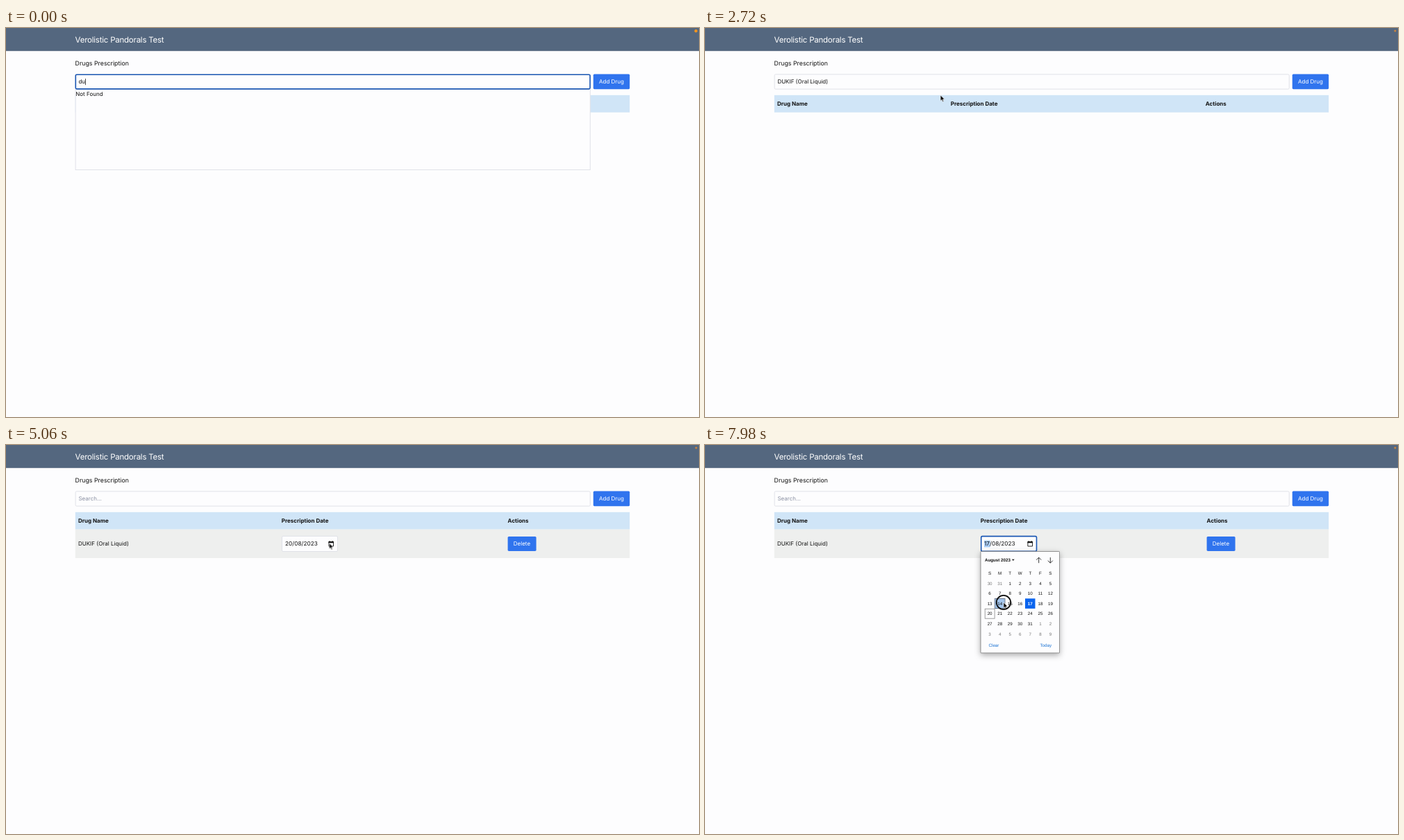
An HTML page for the animation above (8000 ms loop, 998 by 561 pixels).

```html
<!DOCTYPE html>
<html lang="en">
<head>
<meta charset="utf-8">
<title>Drugs Prescription</title>
<style>
html, body { margin: 0; width: 100%; height: 100%; overflow: hidden; background: #fdfdfe; }
svg { display: block; width: 100vw; height: 100vh; }
text { font: 8px Inter, "Open Sans", sans-serif; fill: #111; text-rendering: geometricPrecision; white-space: pre; }
.title { font-size: 11.5px; letter-spacing: -.02em; fill: #fff; }
.label { font-size: 8.8px; }
.head text { font-weight: 700; }
.btn rect { fill: #3074ee; }
.btn text { fill: #fff; }
.hint { fill: #8b91a3; }
.date { font-size: 8.25px; }
.box { fill: #fdfdfe; stroke: #e0e2e8; }
.focus { fill: none; stroke: #1c58b4; stroke-width: 1.6; }
.mark { fill: #a9cdf6; }
.cal text { font: 6.24px "Liberation Sans", Arial, sans-serif; }
.cal .mid { text-anchor: middle; }
.cal .bold { font-weight: 700; }
.cal .dim { fill: #777; }
.cal .link { fill: #1670d2; }
.cal .on { fill: #fff; }
.sel { fill: #0a64ee; }
.panel { fill: #fdfdfe; stroke: #777; stroke-width: .8; filter: drop-shadow(0 3px 4px rgba(0, 0, 0, .32)); }
.icon { fill: none; stroke: #222; stroke-width: .9; }

/* timed switches: 1% = 80 ms */
.t { animation: 8s step-end infinite; }
.type1 { animation-name: type1; }
.type2 { animation-name: type2; }
.type3 { animation-name: type3; }
.typing { animation-name: typing; }
.none { animation-name: none-found; }
.list { animation-name: list; }
.drop { animation-name: drop; }
.filled { animation-name: filled; }
.before { animation-name: before; }
.after { animation-name: after; }
.picking { animation-name: picking; }
.day20 { animation-name: day20; }
.day17 { animation-name: day17; }
.open { animation-name: open; }
.hover { animation-name: hover; fill: #a3c6ee; stroke: #4a5568; stroke-width: .8; }
.dot-a { animation-name: none-found; }
.dot-b { animation-name: dot; }
.arrow { animation-name: arrow; }
.hand { animation-name: hand; }
.ring { animation: ring 8s linear infinite; fill: none; stroke: #0a0a0a; stroke-width: 1.8; }
.pointer { animation: move 8s ease-in-out infinite; }

@keyframes type1 { 0% { opacity: 1 } 1.25%, 100% { opacity: 0 } }
@keyframes type2 { 0% { opacity: 0 } 1.25% { opacity: 1 } 6.5%, 100% { opacity: 0 } }
@keyframes type3 { 0% { opacity: 0 } 6.5% { opacity: 1 } 22.5%, 100% { opacity: 0 } }
@keyframes typing { 0% { opacity: 1 } 20.8%, 100% { opacity: 0 } }
@keyframes none-found { 0% { opacity: 1 } 11.5%, 100% { opacity: 0 } }
@keyframes dot { 0% { opacity: 0 } 11.5%, 100% { opacity: 1 } }
@keyframes list { 0% { opacity: 0 } 11.5% { opacity: 1 } 22.5%, 100% { opacity: 0 } }
@keyframes drop { 0% { opacity: 1 } 22.5%, 100% { opacity: 0 } }
@keyframes filled { 0% { opacity: 0 } 22.5% { opacity: 1 } 45.5%, 100% { opacity: 0 } }
@keyframes before { 0% { opacity: 1 } 45.5%, 100% { opacity: 0 } }
@keyframes after { 0% { opacity: 0 } 45.5%, 100% { opacity: 1 } }
@keyframes picking { 0% { opacity: 0 } 66.5%, 100% { opacity: 1 } }
@keyframes day20 { 0% { opacity: 1 } 80%, 100% { opacity: 0 } }
@keyframes day17 { 0% { opacity: 0 } 80%, 100% { opacity: 1 } }
@keyframes open { 0% { opacity: 0 } 66.5% { opacity: 1 } 80% { opacity: 0 } 90.75%, 100% { opacity: 1 } }
@keyframes hover {
  0% { opacity: 0; transform: translate(58.24px, 14.56px) }
  73% { opacity: 1; transform: translate(58.24px, 14.56px) }
  74% { opacity: 1; transform: translate(58.24px, 29.12px) }
  80% { opacity: 0; transform: translate(29.12px, 14.56px) }
  96.2% { opacity: 1; transform: translate(29.12px, 14.56px) }
  97.3%, 100% { opacity: 1; transform: translate(14.56px, 29.12px) }
}
@keyframes arrow { 0% { opacity: 0 } 12.5% { opacity: 1 } 40% { opacity: 0 } 54.5%, 100% { opacity: 1 } }
@keyframes hand { 0% { opacity: 0 } 40% { opacity: 1 } 54.5%, 100% { opacity: 0 } }
@keyframes ring {
  0%, 20.7%, 23.3%, 43.9%, 46.5%, 65.2%, 67.8%, 78.4%, 81%, 88.7%, 91.3%, 99% { opacity: 0 }
  21%, 23%, 44.2%, 46.2%, 65.5%, 67.5%, 78.7%, 80.7%, 89%, 91%, 99.5%, 100% { opacity: 1 }
}
@keyframes move {
  0%, 12.5% { transform: translate(318px, 160px) }
  18.5%, 31.75% { transform: translate(271px, 99px) }
  41.5%, 53.25% { transform: translate(885.5px, 79.5px) }
  62.5%, 67.5% { transform: translate(465.5px, 141.5px) }
  74.75%, 82% { transform: translate(469.2px, 222.3px) }
  87.5%, 91.3% { transform: translate(469.2px, 143.2px) }
  98.5%, 100% { transform: translate(429.9px, 227px) }
}
</style>
</head>
<body>
<svg viewBox="0 0 998 561" preserveAspectRatio="none">
  <rect width="998" height="561" fill="#fdfdfe"/>
  <rect width="998" height="33.2" fill="#54677f"/>
  <text class="title" x="99.6" y="21.2">Verolistic Pandorals Test</text>
  <circle class="t dot-a" cx="993.6" cy="4.2" r="2.2" fill="#f0941f"/>
  <circle class="t dot-b" cx="993.9" cy="4.1" r="1.6" fill="#c48342"/>

  <text class="label" x="99.6" y="53.8">Drugs Prescription</text>

  <rect x="99.8" y="96.8" width="798.4" height="24.9" fill="#d0e5f7"/>
  <g class="t head before">
    <text x="104" y="112.1">Drug Name</text>
    <text x="353.8" y="112.1">Prescription Date</text>
    <text x="720.8" y="112.1">Actions</text>
  </g>

  <g class="t after">
    <rect x="99.8" y="121.7" width="798.4" height="41.4" fill="#eeefee"/>
    <g class="head">
      <text x="104" y="112.1">Drug Name</text>
      <text x="396.8" y="112.1">Prescription Date</text>
      <text x="722.6" y="112.1">Actions</text>
    </g>
    <text x="104" y="145.3">DUKIF (Oral Liquid)</text>
    <rect class="box" x="397.5" y="131.5" width="80" height="22" rx="1.5"/>
    <g class="t picking">
      <rect class="focus" x="397.7" y="131.6" width="79.8" height="21.7" rx="1.8"/>
      <rect class="t mark day20" x="402" y="137.6" width="10.2" height="9.8"/>
      <rect class="t mark day17" x="402" y="137.6" width="8.6" height="9.8"/>
    </g>
    <text class="t date day20" x="402" y="145.4">20/08/2023</text>
    <text class="t date day17" x="402" y="145.4">17/08/2023</text>
    <path d="M464.9 139.6h6.6v6.4h-6.6z" fill="none" stroke="#111" stroke-width=".9"/>
    <path d="M464.5 139.2h7.4v2h-7.4zM465.6 138.3h1v1h-1zM469.8 138.3h1v1h-1z" fill="#111"/>
    <g class="btn">
      <rect x="722.6" y="132" width="41" height="20.9" rx="1.6"/>
      <text x="730.8" y="145.3">Delete</text>
    </g>
  </g>

  <rect class="box" x="100.1" y="66.9" width="741.2" height="21.2" rx="1.6"/>
  <g class="t drop">
    <rect class="box" x="100.1" y="88.3" width="741.2" height="116.2"/>
    <text class="t none" x="100.3" y="98.2">Not Found</text>
    <g class="t list">
      <text x="100.3" y="98.2">DUKIF (Oral Liquid)</text>
      <text x="100.3" y="110.7">DUKIF (Oral Pill)</text>
      <text x="100.3" y="123.2">DUKIF COLD (Oral Pill)</text>
      <text x="100.3" y="135.7">DUKIF PM (Oral Pill)</text>
    </g>
  </g>
  <rect class="t focus typing" x="100.3" y="67.2" width="740.8" height="20.7" rx="1.6"/>
  <g class="t type1"><text x="104.4" y="80.4">du</text><rect x="114.1" y="73" width=".7" height="9.2"/></g>
  <g class="t type2"><text x="104.4" y="80.4">duk</text><rect x="118.6" y="73" width=".7" height="9.2"/></g>
  <g class="t type3"><text x="104.4" y="80.4">dukif</text><rect class="t typing" x="123.2" y="73" width=".7" height="9.2"/></g>
  <text class="t filled" x="104.4" y="80.4">DUKIF (Oral Liquid)</text>
  <text class="t hint after" x="104.4" y="80.4">Search...</text>
  <g class="btn">
    <rect x="845.8" y="66.6" width="52.4" height="21.6" rx="1.6"/>
    <text x="854" y="80.4">Add Drug</text>
  </g>

  <g class="t cal open">
    <rect class="panel" x="397" y="153.5" width="113.6" height="146.4" rx=".8"/>
    <text class="bold" x="402.9" y="168">August 2023</text>
    <path d="M441.8 164.8h4l-2 2.2z" fill="#222"/>
    <path class="icon" d="M480.7 170.2v-8M477.2 165.7l3.5-3.5 3.5 3.5M497.3 162.2v8M493.8 166.7l3.5 3.5 3.5-3.5"/>
    <rect class="t hover" x="402.9" y="192.3" width="14.3" height="14.3"/>
    <g id="days"></g>
    <g class="t day20">
      <rect class="sel" x="402.8" y="235.9" width="14.5" height="14.5"/>
      <text class="mid bold on" x="410.1" y="245.5">20</text>
    </g>
    <g class="t day17">
      <rect x="403.2" y="236.3" width="13.9" height="13.9" fill="none" stroke="#888" stroke-width=".8"/>
      <rect class="sel" x="461" y="221.4" width="14.5" height="14.5"/>
      <text class="mid bold on" x="468.3" y="230.9">17</text>
    </g>
    <text class="link" x="408.5" y="290.9">Clear</text>
    <text class="link" x="482.4" y="290.9">Today</text>
  </g>

  <g class="pointer">
    <path class="t arrow" d="M0 0V8.2L1.9 6.5L3.2 9.4L4.6 8.8L3.3 6H5.9Z" fill="#0a0a0a" stroke="#fff" stroke-width=".6"/>
    <path class="t hand" d="M-.8 .6Q0-.4 .7 .6V3L3.6 3.8Q4.5 4.1 4.3 5.2L3.6 8.2H-.7L-3.1 5Q-3.1 3.9-2 4.3L-.8 5.2Z" fill="#fff" stroke="#111" stroke-width=".9" stroke-linejoin="round"/>
    <circle class="ring" r="10.2"/>
  </g>
</svg>
<script>
const days = document.getElementById("days");
const PITCH = 14.56;

function addCell(label, col, y, dim) {
  const el = document.createElementNS("http://www.w3.org/2000/svg", "text");
  el.setAttribute("class", dim ? "mid dim" : "mid");
  el.setAttribute("x", 410.1 + col * PITCH);
  el.setAttribute("y", y);
  el.textContent = label;
  days.append(el);
}

[..."SMTWTFS"].forEach((name, col) => addCell(name, col, 187));
for (let i = 0; i < 42; i++) {
  const date = new Date(2023, 6, 30 + i);
  addCell(date.getDate(), i % 7, 201.8 + Math.floor(i / 7) * PITCH, date.getMonth() !== 7);
}
</script>
</body>
</html>
```
